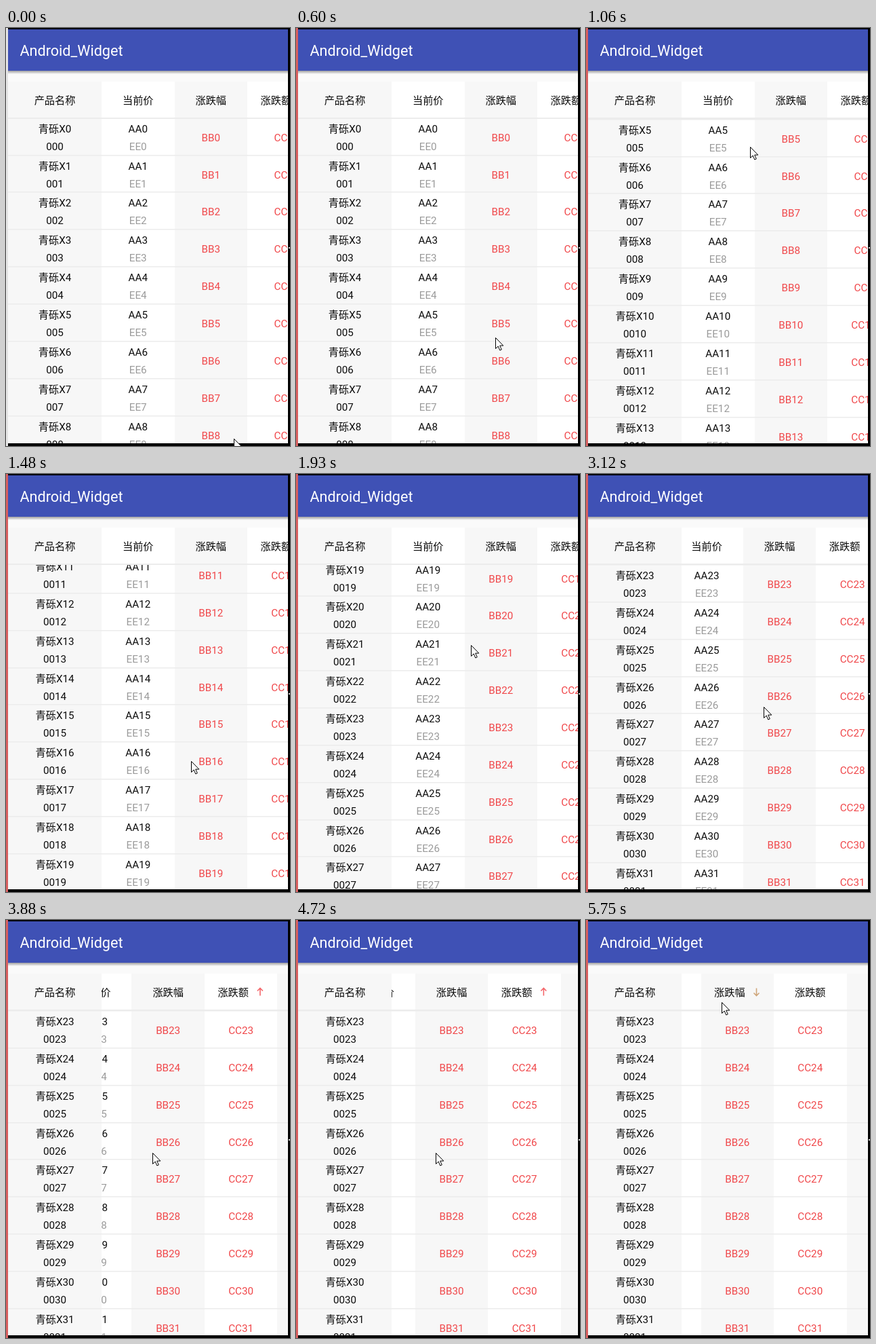
An HTML page with a canvas that plays this animation: 419x616 px, repeating every 8 s.

```html
<!DOCTYPE html>
<html lang="zh">
<head>
<meta charset="utf-8">
<style>
  html, body { margin: 0; width: 100%; height: 100%; overflow: hidden; background: #000; }
  canvas { display: block; }
</style>
</head>
<body>
<canvas id="stage" width="419" height="616"></canvas>
<script>
const ctx = document.getElementById('stage').getContext('2d');
const LOOP = 8000, ROW = 54.85, COL = 107.5, LEFT = 141, TOP = 132.7, BOTTOM = 612;
const FONT = 'Roboto, "Noto Sans CJK SC", "Noto Sans CJK", sans-serif';
const RED = '#f0474a', BLACK = '#0c0c0c', GREY = '#9a9a9a';
const STRIPE = '#f7f7f7', LINE = '#ececec';

// Decelerating progress from 0 to 1, shared by flings, drags and the pointer.
function ease(t, start, duration) {
  const p = Math.min(1, Math.max(0, (t - start) / duration));
  return 1 - (1 - p) ** 2.36;
}

const scrollAt = t => 627.5 * ease(t, 910, 705) + 632.75 * ease(t, 1572, 965);
const panAt = t => 58 * ease(t, 3050, 530) + 11 * ease(t, 3800, 350) + 10 * ease(t, 4660, 350);

// Pointer stops: start, duration, x, y. While panning, it drags the columns along.
const stops = [
  [70, 330, 392, 480], [400, 510, 250, 445], [910, 150, 242, 174], [1060, 420, 273, 423],
  [1572, 130, 258, 251], [1930, 460, 342, 351], [2390, 150, 279, 343], [5000, 430, 279, 121]
];
function pointerAt(t) {
  let x = 336, y = 605;
  for (const [start, duration, toX, toY] of stops) {
    const p = ease(t, start, duration);
    x += (toX - x) * p;
    y += (toY - y) * p;
  }
  return [Math.round(x - panAt(t)), Math.round(y)];
}

function rect(x, y, w, h, color) {
  ctx.fillStyle = color;
  ctx.fillRect(x, y, w, h);
}

function text(s, x, y, color = BLACK, align = 'center', size = 15.2) {
  ctx.font = `${size}px ${FONT}`;
  ctx.textAlign = align;
  ctx.fillStyle = color;
  ctx.fillText(s, x, y);
}

function clipped(x, y, right, draw) {
  ctx.save();
  ctx.beginPath();
  ctx.rect(x, y, right - x, BOTTOM - y);
  ctx.clip();
  draw();
  ctx.restore();
}

function arrow(x, dir, color) {
  const tip = 106 + 5.5 * dir;
  ctx.strokeStyle = color;
  ctx.lineWidth = 1.6;
  ctx.beginPath();
  ctx.moveTo(x, 106 - 5.5 * dir);
  ctx.lineTo(x, tip);
  ctx.moveTo(x - 4, tip - 4 * dir);
  ctx.lineTo(x, tip);
  ctx.lineTo(x + 4, tip - 4 * dir);
  ctx.stroke();
}

function eachRow(scroll, draw) {
  const first = Math.floor(scroll / ROW);
  for (let i = first; i < first + 10; i++) draw(i, Math.round(TOP + i * ROW - scroll));
}

function columns(scroll, pan, sorted) {
  const colX = n => LEFT + n * COL - pan;
  const mid = n => colX(n) + COL / 2;
  for (let n = 0; n < 5; n++) rect(Math.round(colX(n)), 79, 108, 534, n % 2 ? STRIPE : '#fff');
  ['当前价', '涨跌幅', '涨跌额'].forEach((label, n) => {
    if (n !== sorted) return text(label, mid(n), 112);
    text(label, colX(n) + 19.5, 112, BLACK, 'left');
    if (n === 2) arrow(colX(n) + 82, -1, '#f4666a');
    else arrow(colX(n) + 82, 1, '#cfa67a');
  });
  clipped(LEFT, 133, 416, () => eachRow(scroll, (i, y) => {
    text('AA' + i, mid(0), y + 21);
    text('EE' + i, mid(0), y + 46.5, GREY);
    text('BB' + i, mid(1), y + 33.5, RED);
    text('CC' + i, mid(2), y + 33.5, RED);
  }));
}

function nameColumn(scroll) {
  rect(3, 79, 138, 534, STRIPE);
  text('产品名称', 72, 112);
  clipped(3, 133, LEFT, () => eachRow(scroll, (i, y) => {
    text('青砾X' + i, 72, y + 21);
    text('00' + i, 72, y + 46.5);
  }));
}

function appBar() {
  const shade = ctx.createLinearGradient(0, 63, 0, 68);
  shade.addColorStop(0, 'rgba(0,0,0,.36)');
  shade.addColorStop(1, 'rgba(0,0,0,0)');
  rect(3, 63, 413, 5, shade);
  rect(3, 2, 413, 61, '#3f51b5');
  text('Android_Widget', 20.5, 41, '#fff', 'left', 21.6);
}

function pointer(x, y) {
  ctx.save();
  ctx.translate(x + .5, y + .5);
  ctx.beginPath();
  [[0, 0], [0, 16], [3.7, 12.5], [6.3, 18.5], [8.8, 17.4], [6.2, 11.6], [11.3, 11.6]]
    .forEach(p => ctx.lineTo(...p));
  ctx.closePath();
  ctx.fillStyle = '#fff';
  ctx.strokeStyle = '#000';
  ctx.lineWidth = 1;
  ctx.fill();
  ctx.stroke();
  ctx.restore();
}

function draw(t) {
  const scroll = scrollAt(t);
  rect(0, 0, 419, 616, '#000');
  clipped(3, 2, 416, () => {
    rect(3, 2, 413, 611, '#fafafa');
    columns(scroll, panAt(t), t < 5750 ? 2 : 1);
    nameColumn(scroll);
    clipped(3, 133, 416, () => eachRow(scroll, (i, y) => rect(3, y - 1, 413, 1.5, LINE)));
    rect(3, 132, 413, 2, LINE);
    appBar();
  });
  rect(0, 0, 3, 616, t < 70 ? '#e4e4e4' : '#d75f5f');
  rect(417, 323, 2, 2, '#ccc');
  pointer(...pointerAt(t));
}

function tick() {
  draw(performance.now() % LOOP);
  requestAnimationFrame(tick);
}
tick();
</script>
</body>
</html>
```
